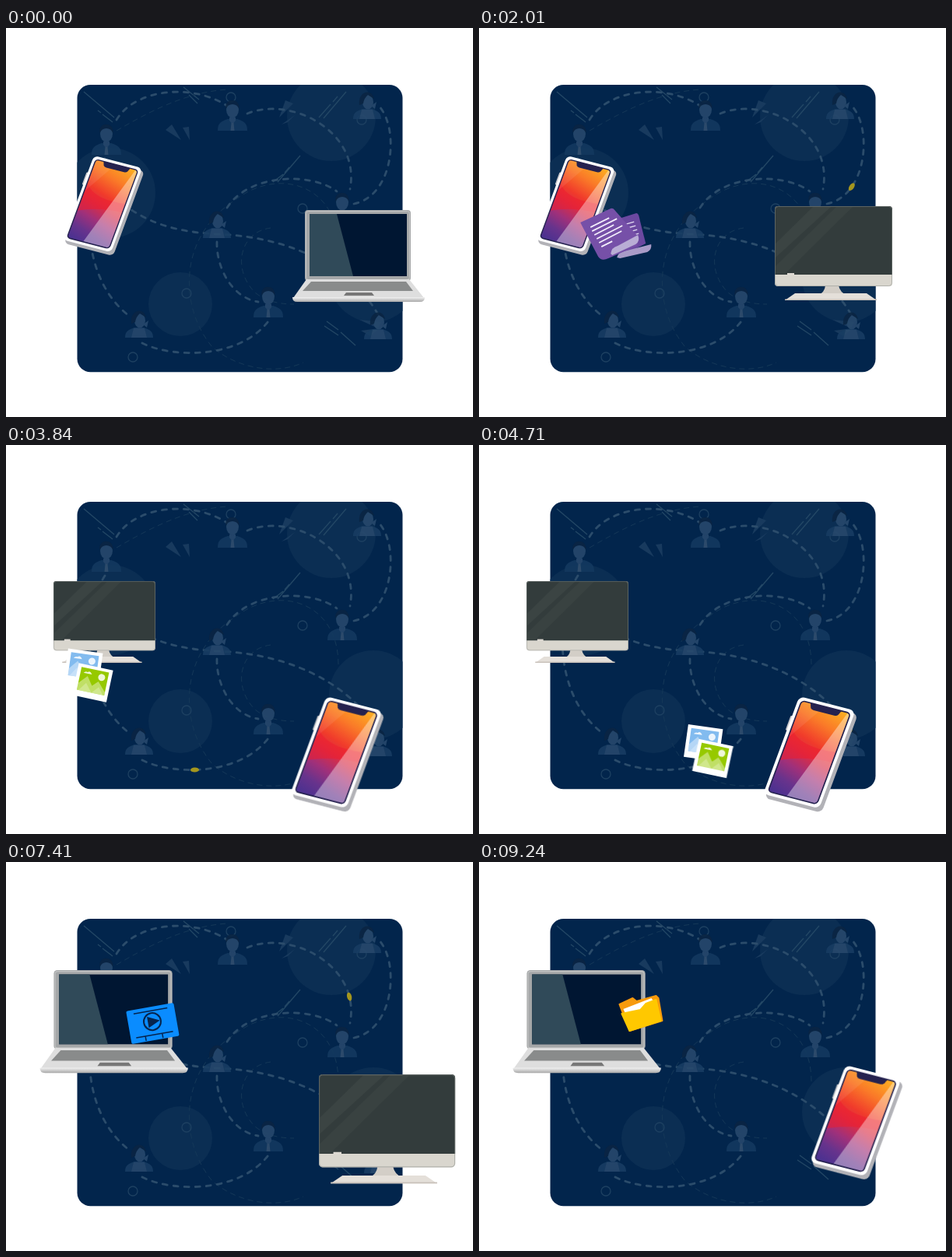
An HTML page that plays this animation: 600 by 500 pixels, repeating every 9270 ms.

```html
<!DOCTYPE html>
<html lang="en">
<head>
<meta charset="utf-8">
<title>File transfer between devices</title>
<style>
html, body { margin: 0; width: 100%; height: 100%; overflow: hidden; background: #fff; }
svg { display: block; width: 600px; height: 500px; }
</style>
</head>
<body>
<svg viewBox="0 0 600 500">
<defs>
  <linearGradient id="sunset" gradientUnits="userSpaceOnUse" x1="52" y1="2" x2="16" y2="112">
    <stop offset="0" stop-color="#fdb321"/><stop offset=".22" stop-color="#fa7a28"/>
    <stop offset=".42" stop-color="#f03a2b"/><stop offset=".55" stop-color="#d82d48"/>
    <stop offset=".7" stop-color="#a0307a"/><stop offset=".85" stop-color="#68338c"/>
    <stop offset="1" stop-color="#4a3190"/>
  </linearGradient>
  <linearGradient id="lip" x2="0" y2="1">
    <stop offset="0" stop-color="#f2f2f2"/><stop offset="1" stop-color="#a9a9a9"/>
  </linearGradient>
  <clipPath id="panelClip"><rect x="91.500" y="73" width="418" height="369.200" rx="17"/></clipPath>
  <clipPath id="phoneClip"><rect x="4" y="4" width="55" height="107" rx="4"/></clipPath>

  <g id="man">
    <path d="M-19 0C-19-10-15-12-6-15H6C15-12 19-10 19 0Z" fill="#14395f"/>
    <path d="M-4-17H4V-13L0-8-4-13Z" fill="#27496c"/>
    <path d="M-1.500-10H1.500L2.500 0H-2.500Z" fill="#31506f"/>
    <ellipse cy="-27" rx="8" ry="10.500" fill="#27496c"/>
    <path d="M-8.500-28C-11-43 10-43 8.500-28Q6-34 0-34T-8.500-28Z" fill="#0b2543"/>
  </g>
  <g id="woman">
    <path d="M-18 0C-18-9-13-10-6-13H6C13-10 18-9 18 0Z" fill="#183d62"/>
    <path d="M-7-12H7L10 0H-10Z" fill="#27496c"/>
    <ellipse cx="1" cy="-22" rx="7" ry="9.500" fill="#27496c"/>
    <path d="M-10-18C-12-36 6-40 9-26L1-31Q-4-27-5-20Z" fill="#0b2543"/>
    <path d="M5-17L12-22 10-13Z" fill="#27496c"/>
  </g>

  <g id="phone"><g transform="matrix(.985 .255 -.348 .941 41 0)">
    <rect x="3" y="3" width="64" height="116" rx="6" fill="#b2b2b7"/>
    <rect x="-1.500" y="23" width="3" height="17" rx="1" fill="#c9c9cd"/>
    <rect x="0" y="0" width="63" height="115" rx="6" fill="#fff"/>
    <g clip-path="url(#phoneClip)">
      <path d="M4 4H59V111H4Z" fill="url(#sunset)"/>
      <path d="M4 36Q18 55 59 50V62Q30 62 4 74Z" fill="#ee1c2e" opacity=".55"/>
      <path d="M56 4H59V111H25Z" fill="#fff" opacity=".38"/>
      <path d="M4 4H30L4 48Z" fill="#fff" opacity=".08"/>
      <path d="M14 4H49L47 9Q46 11 43 11H20Q17 11 16 9Z" fill="#25224f"/>
    </g>
    <rect x="4" y="4" width="55" height="107" rx="4" fill="none" stroke="#25224f" stroke-width="1.400"/>
  </g></g>

  <g id="laptop">
    <rect x="16" width="136" height="91" rx="4" fill="#a5a7a8"/>
    <rect x="17.500" y="1.500" width="133" height="88" rx="3" fill="none" stroke="#c2c3c3"/>
    <path d="M22 5H147V85H22Z" fill="#001632"/>
    <path d="M22 5H57L78 85H22Z" fill="#304a59"/>
    <path d="M18 89H150L169 113H1Z" fill="#dedede"/>
    <path d="M24 92H146L155 104H13Z" fill="#898b8b"/>
    <path d="M69 106H102L105 110H66Z" fill="#777"/>
    <path d="M0 112H170Q170 118 164 118H6Q0 118 0 112Z" fill="url(#lip)"/>
  </g>

  <g id="desktop">
    <path d="M65 102H82Q84 111 92 114H56Q64 111 65 102Z" fill="#d3cec7"/>
    <path d="M26 112H118L131 121H13Z" fill="#e4dfd9"/>
    <path d="M13 119.500H131V121H13Z" fill="#c9c2bb"/>
    <rect width="151" height="103" rx="4" fill="#d9d6ce"/>
    <path d="M0 88V4Q0 0 4 0H147Q151 0 151 4V88Z" fill="#333c3c"/>
    <path d="M1 48L49 1H72L1 66Z" fill="#3b4443"/>
    <path d="M1 77L79 1H100L13 87H1Z" fill="#394241"/>
    <rect x=".5" y=".5" width="150" height="102" rx="4" fill="none" stroke="#888b88" stroke-opacity=".5"/>
    <path d="M16 86H25V89H16Z" fill="#ddd9d2"/>
  </g>

  <g id="docs">
    <path d="M-3-18L26-27Q28-27 29-24L38 12 5 29Z" fill="#6b48a0"/>
    <path d="M1 30Q2 24 10 22L45 13Q46 20 40 23L5 31Z" fill="#a99bc8"/>
    <path d="M9-12L23-16M11-7L25-11M13-2L27-6M15 3L29-1" stroke="#e2d9f0" stroke-width="1.500"/>
    <path d="M-46-15L-7-33Q-4-34-2-31L29 4 27 15-10 31Q-19 35-23 29Z" fill="#7650a8"/>
    <path d="M-7 25Q-6 17 2 15L28 1Q31 9 25 13L-5 27Z" fill="#b9add5"/>
    <path d="M-33-9L-9-21M-31-4L1-20M-28 1L-3-12M-25 6L8-11M-22 11L7-4M-19 16L-5 9" stroke="#f3eefb" stroke-width="1.700"/>
  </g>

  <g id="photo">
    <rect x="-22.500" y="-21" width="45" height="42" fill="#fff"/>
    <path d="M-18-17H18V13H-18Z"/>
    <path d="M-18 13V4L-8-7 0 4 7-3 18 9V13Z" fill="#fff" opacity=".4"/>
    <path d="M-16 13L-8 2 1 13 9 4 16 13Z" fill="#fff" opacity=".25"/>
    <circle cx="10" cy="-9" r="4.500" fill="#fff" opacity=".85"/>
    <path d="M-14-10Q-12-13-9-12-6-15-3-10Z" fill="#fff" opacity=".85"/>
  </g>
  <g id="photos">
    <use href="#photo" transform="translate(-7 -12) rotate(8)" fill="#82bbef"/>
    <use href="#photo" transform="translate(5 8) rotate(12)" fill="#96c900"/>
  </g>

  <g id="video"><g transform="rotate(-10)" fill="none" stroke="#06244d" stroke-width="1.500">
    <rect x="-31" y="-21" width="62" height="43" rx="2" fill="#0a8cff" stroke="none"/>
    <path d="M-22-16H22M-24 15H24M-12 15V21M10 15V21"/>
    <circle cy="-2" r="11" stroke-width="2"/>
    <path d="M-5-8L8-2-5 4Z" fill="#06244d"/>
  </g></g>

  <g id="folder" stroke-linejoin="round">
    <path d="M-27-12L-10-20-5-16 20-23 23-20 28 9-14 22Z" fill="#f79a0c" stroke="#f79a0c" stroke-width="2"/>
    <path d="M-22-6L14-20 19-13-18 3Z" fill="#fff"/>
    <path d="M-24 0L0-5 7-13 20-18 26 9-14 22Z" fill="#ffc800" stroke="#ffc800" stroke-width="2"/>
  </g>
</defs>

<g clip-path="url(#panelClip)">
  <path d="M91 73H510V443H91Z" fill="#02254c"/>
  <g fill="#0b2e53">
    <circle cx="134" cy="212" r="58"/><circle cx="418" cy="114" r="57"/>
    <circle cx="224" cy="355" r="41"/><circle cx="472" cy="321" r="57"/>
  </g>
  <g fill="#183a5e">
    <path d="M205 131L213 124 225 144ZM227 128L235 127 236 144ZM359 93L369 97 351 115ZM354 124L371 112 362 121ZM454 375L482 378 478 386ZM456 389L480 386 468 396Z"/>
  </g>
  <g fill="none" stroke="#1d4061" stroke-width="1.300">
    <circle cx="289" cy="89" r="6"/><circle cx="457" cy="118" r="6"/><circle cx="381" cy="232" r="6"/>
    <circle cx="232" cy="341" r="6"/><circle cx="163" cy="423" r="6"/>
    <path stroke="#234765" d="M100 82L139 115M118 106L122 109M124 111L137 121M228 76L248 92M235 86L246 97M437 82L408 116M426 88L420 95M417 98L402 115M378 164L349 198M364 179L358 186M356 188L343 198M412 377L427 388M430 391L449 408M409 383L427 395"/>
    <path stroke="#153858" stroke-width="1" stroke-dasharray="7 5" d="M142 132C180 110 230 82 285 79M427 282C427 202 350 177 293 222C220 270 223 360 265 410C300 440 350 445 382 430M340 257C300 262 290 310 320 340Q338 355 370 355"/>
  </g>
  <g id="routes" fill="none" stroke="#2b4c6b" stroke-width="2.800" stroke-dasharray="6 8" stroke-linecap="round"/>
  <g id="people" opacity=".9"/>
  <ellipse id="spark" rx="5.500" ry="3" fill="#a4961e"/>
</g>
<use id="left"/><use id="right"/><use id="item"/>
</svg>

<script>
const LOOP = 9270;
const $ = id => document.getElementById(id);
const add = (parent, tag, attrs) => {
  const node = document.createElementNS("http://www.w3.org/2000/svg", tag);
  for (const key in attrs) node.setAttribute(key, attrs[key]);
  return $(parent).appendChild(node);
};

const routes = {};
Object.entries({
  top: "M142 118C165 79 238 70 284 100",
  upper: "M310 110C365 87 456 132 442 207",
  loop: "M447 226C500 215 506 125 477 98",
  middle: "M284 231C312 187 392 185 425 210",
  main: "M478 368C455 328 398 276 290 266C250 264 203 262 160 233",
  inner: "M271 275C270 305 288 346 324 352",
  side: "M127 168C100 210 92 318 158 370",
  bottom: "M175 405C215 425 300 425 337 377"
}).forEach(([name, d]) => routes[name] = add("routes", "path", { d }));

const placePeople = (kind, spots) => spots.forEach(([x, y]) =>
  add("people", "use", { href: "#" + kind, transform: `translate(${x} ${y})` }));
placePeople("man", [[129, 163], [291, 132], [432, 251], [337, 372]]);
placePeople("woman", [[271, 270], [464, 117], [171, 398], [478, 400]]);

// Device positions: kind, x, y, scale
const phoneLeft = ["phone", 72, 164, 1];
const deskLeft = ["desktop", 61, 175, .867];
const laptopLeft = ["laptop", 43.5, 139, 1.12];

// Item keys: time since the scene began, x, y
const scenes = [
  { start: 0, left: phoneLeft, right: ["laptop", 368, 234, 1], item: "docs",
    keys: [[30, 128, 193], [300, 170, 258], [930, 267, 302], [1600, 435, 288]] },
  { start: 1800, left: phoneLeft, right: ["desktop", 380, 229, 1], item: "docs",
    keys: [[30, 112, 215], [210, 176, 265], [800, 290, 304], [1260, 373, 293], [1600, 432, 280]] },
  { start: 3600, left: deskLeft, right: ["phone", 364, 323, 1.16], item: "photos",
    keys: [[30, 116, 235], [150, 97, 272], [560, 160, 375], [1110, 295, 395], [1600, 415, 395]] },
  { start: 5460, left: deskLeft, right: ["laptop", 351, 346, 1.02], item: "video",
    keys: [[60, 90, 222], [150, 99, 226], [510, 268, 240], [1050, 363, 299], [1550, 437, 390]] },
  { start: 7200, left: laptopLeft, right: ["desktop", 402, 273, 1.16], item: "video",
    keys: [[0, 92, 190], [210, 188, 207], [700, 330, 250], [1170, 434, 290], [1550, 485, 320]] },
  { start: 9000, left: laptopLeft, right: ["phone", 424, 261, 1.15], item: "folder",
    keys: [[0, 94, 192], [240, 207, 195], [270, 218, 196]] }
];

// Spark trips: route, start, end, fraction of the route covered
const trips = [
  ["inner", 100, 1150, 1],
  ["loop", 1680, 2960, 1],
  ["bottom", 3300, 4670, 1],
  ["main", 4680, 6160, .62],
  ["upper", 6420, 7620, 1]
];

function smooth(keys, t) {
  const last = keys.length - 1;
  if (t >= keys[last][0]) return keys[last].slice(1);
  const i = keys.findIndex(key => key[0] > t) - 1;
  const [a, b] = [keys[i], keys[i + 1]];
  const span = b[0] - a[0], u = (t - a[0]) / span;
  const slope = (k, axis) => {
    const p = keys[Math.max(k - 1, 0)], n = keys[Math.min(k + 1, last)];
    return (n[axis] - p[axis]) / (n[0] - p[0]);
  };
  return [1, 2].map(axis => {
    const delta = b[axis] - a[axis];
    const m0 = slope(i, axis) * span, m1 = slope(i + 1, axis) * span;
    return a[axis] + u * (m0 + u * (3 * delta - 2 * m0 - m1 + u * (m0 + m1 - 2 * delta)));
  });
}

function show(id, kind, x, y, scale = 1) {
  $(id).setAttribute("href", "#" + kind);
  $(id).setAttribute("transform", `translate(${x} ${y}) scale(${scale})`);
}

function drawSpark(t) {
  const trip = trips.find(([, from, to]) => t >= from && t < to);
  $("spark").style.display = trip ? "" : "none";
  if (!trip) return;
  const [name, from, to, part] = trip;
  const route = routes[name];
  const at = route.getTotalLength() * part * (t - from) / (to - from);
  const p = route.getPointAtLength(at);
  const before = route.getPointAtLength(at - 1), after = route.getPointAtLength(at + 1);
  const angle = Math.atan2(after.y - before.y, after.x - before.x) * 180 / Math.PI;
  $("spark").setAttribute("transform", `translate(${p.x} ${p.y}) rotate(${angle})`);
}

function draw(t) {
  const scene = scenes.findLast(s => s.start <= t);
  const local = t - scene.start;
  show("left", ...scene.left);
  show("right", ...scene.right);
  const visible = local >= scene.keys[0][0];
  $("item").style.display = visible ? "" : "none";
  if (visible) show("item", scene.item, ...smooth(scene.keys, local));
  drawSpark(t);
}

const began = performance.now();
function tick() {
  draw((performance.now() - began) % LOOP);
  requestAnimationFrame(tick);
}
tick();
</script>
</body>
</html>
```
